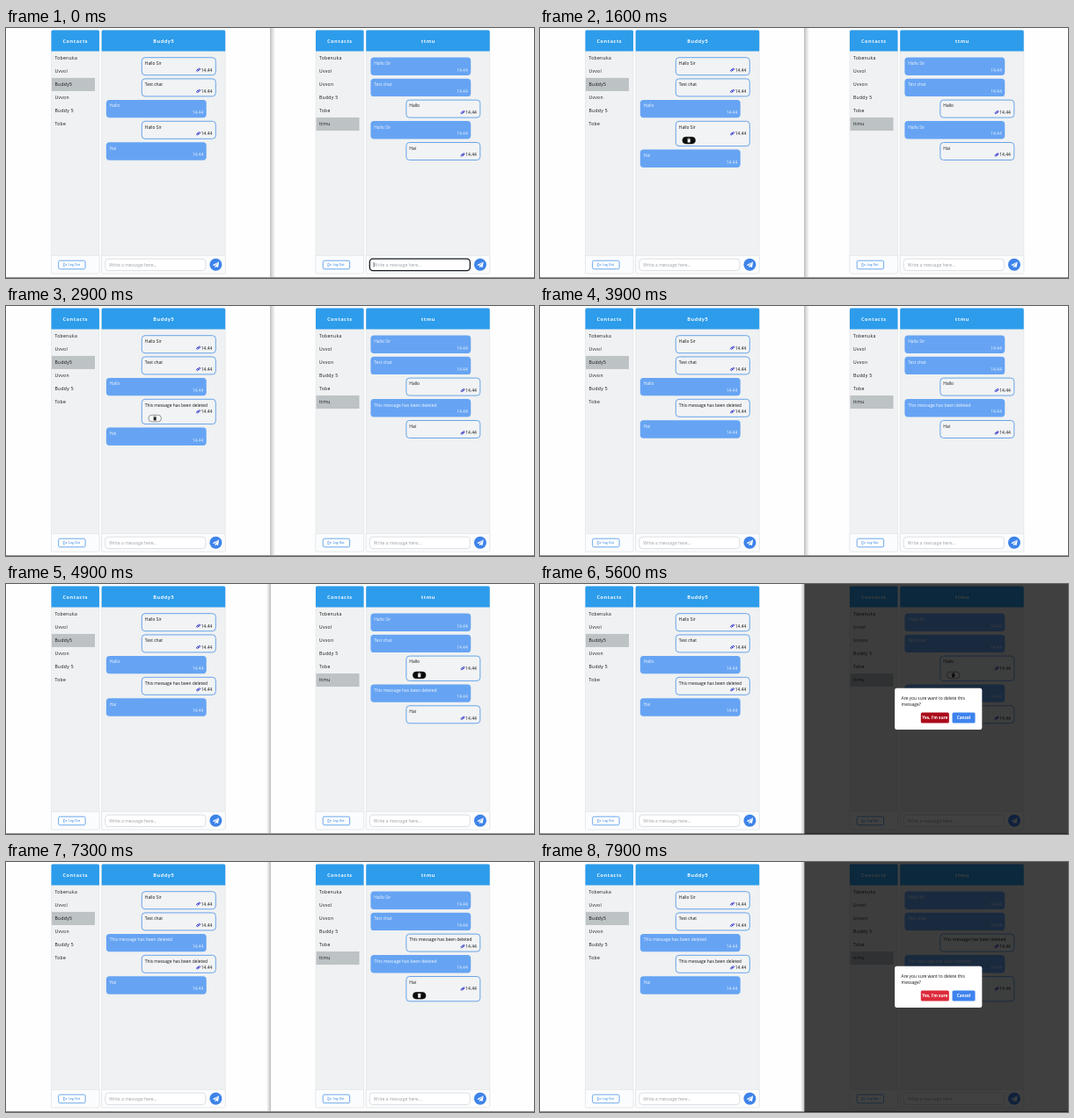
An HTML page with a canvas that plays this animation: 600x285 px, repeating every 8000 ms.

```html
<!DOCTYPE html>
<html lang="en">
<head>
<meta charset="utf-8">
<title>Two chat windows</title>
<style>
  html, body { margin: 0; width: 100%; height: 100%; overflow: hidden; background: #fff; }
  canvas { display: block; width: 600px; height: 285px; }
</style>
</head>
<body>
<canvas id="stage"></canvas>
<script>
const W = 600, H = 285, LOOP = 8000;
const GONE = 'This message has been deleted';
const FONT = '"Open Sans", "Noto Sans", sans-serif';
const canvas = document.getElementById('stage');
const ctx = canvas.getContext('2d');
const ratio = window.devicePixelRatio || 1;
canvas.width = W * ratio;
canvas.height = H * ratio;

const within = (t, a, b) => t >= a && t < b;

function text(str, x, y, color, { size = 4.9, weight = 400, align = 'left', gap = 0 } = {}) {
  ctx.font = `${weight} ${size}px ${FONT}`;
  ctx.letterSpacing = gap + 'px';
  ctx.textAlign = align;
  ctx.textBaseline = 'alphabetic';
  ctx.fillStyle = color;
  ctx.fillText(str, x, y + size * 0.36);
}

function box(x, y, w, h, r, fill, stroke, line = 1) {
  ctx.beginPath();
  ctx.roundRect(x, y, w, h, r);
  if (fill) { ctx.fillStyle = fill; ctx.fill(); }
  if (stroke) { ctx.strokeStyle = stroke; ctx.lineWidth = line; ctx.stroke(); }
}

function path(points, color, line) {
  ctx.beginPath();
  points.forEach(([x, y], i) => i ? ctx.lineTo(x, y) : ctx.moveTo(x, y));
  if (line) { ctx.strokeStyle = color; ctx.lineWidth = line; ctx.stroke(); }
  else { ctx.fillStyle = color; ctx.fill(); }
}

function seenMark(x, y) {
  ctx.save();
  ctx.translate(x, y);
  ctx.rotate(-0.65);
  box(-2.3, -0.9, 2.6, 1.6, 0.8, null, '#2626c8', 0.8);
  box(-0.3, -0.7, 2.6, 1.6, 0.8, null, '#2626c8', 0.8);
  ctx.restore();
}

function trash(x, y, hot) {
  const ink = hot ? '#fff' : '#222';
  box(x - 7.3, y - 3.8, 14.6, 7.6, 3.8, hot ? '#0b0b0b' : '#f7f8f9', hot ? '#0b0b0b' : '#555', 0.6);
  box(x - 1.5, y - 1.2, 3, 3.6, 0.5, ink);
  box(x - 2, y - 2.2, 4, 0.7, 0.2, ink);
  box(x - 0.7, y - 2.6, 1.4, 0.6, 0.2, ink);
}

function bubble(x, y, own, str, open, hot) {
  const h = open ? 28.3 : 20;
  if (own) {
    box(x + 0.5, y, 84, h, 3.7, '#f1f3f4', '#68a4e9', 1);
    text(str, x + 4, y + 6.5, '#111');
    text('14.44', x + 80.5, y + 14.1, '#111', { align: 'right' });
    seenMark(x + 64.8, y + 14);
    if (open) trash(x + 15.4, y + 21.8, hot);
  } else {
    box(x, y - 0.2, 113.8, 20.4, 3.7, '#66a4f3');
    text(str, x + 3.8, y + 6.5, '#f4f8ff');
    text('14.44', x + 110.3, y + 14.1, '#e8f1ff', { align: 'right' });
  }
  return h + 4.2;
}

function modal(x, hot) {
  ctx.fillStyle = 'rgba(0,0,0,0.745)';
  ctx.fillRect(x ? 300.5 : 0, 0, 300.5, H);
  ctx.save();
  ctx.translate(x, 0);
  box(102.3, 118.7, 99.2, 47.4, 2.4, '#fff');
  text('Are you sure want to delete this', 109.8, 130, '#111');
  text('message?', 109.8, 137.6, '#111');
  box(132, 146.4, 32, 12.2, 1.6, hot ? '#ab0a1b' : '#dc2b3b');
  text("Yes, I'm sure", 148, 152.5, '#fff', { weight: 700, size: 4.7, align: 'center' });
  box(167.7, 146.4, 26, 12.2, 1.6, '#3f83ee');
  text('Cancel', 180.7, 152.5, '#fff', { weight: 700, size: 4.7, align: 'center' });
  ctx.restore();
}

function chat(x, { title, names, active, messages, focus, caret }) {
  ctx.save();
  ctx.translate(x, 0);

  box(51.5, 2.7, 54.5, 277.3, 1.5, '#eff1f2', '#dfe3e6', 0.6);
  box(108.7, 2.7, 140.5, 277.3, 1.5, '#eff1f2', '#dfe3e6', 0.6);
  for (const [px, pw] of [[51.5, 54.5], [108.7, 140.5]]) {
    box(px, 2.5, pw, 24, [1.5, 1.5, 0, 0], '#2c9ceb');
    box(px, 259.5, pw, 20.5, [0, 0, 1.5, 1.5], '#fbfcfd', '#dfe3e6', 0.6);
  }
  const head = { size: 5.6, weight: 700, align: 'center', gap: 0.5 };
  text('Contacts', 78.8, 14.8, '#f2f8fe', head);
  text(title, 179.3, 14.6, '#f2f8fe', head);

  ctx.fillStyle = '#bdc2c5';
  ctx.fillRect(52, 56.9 + (active - 2) * 15.05, 49, 15);
  names.forEach((n, i) => text(n, 55.4, 34.2 + i * 15.05, '#111', { size: 5, gap: 0.35 }));

  box(59.7, 265.2, 30.4, 9.6, 1.6, '#fff', '#5c9fe9', 0.9);
  path([[67, 268.3], [65.3, 268.3], [65.3, 271.7], [67, 271.7]], '#4b93e6', 0.6);
  path([[66.4, 270], [69, 270]], '#4b93e6', 0.6);
  path([[68, 268.9], [69.1, 270], [68, 271.1]], '#4b93e6', 0.5);
  text('Log Out', 71.2, 270, '#4b93e6', { size: 3.4, weight: 600 });

  box(112.8, 263.2, 114, 13.4, 3.6, '#fff', focus ? '#141a22' : '#d3d7dc', focus ? 1.3 : 0.8);
  text('Write a message here...', 117.3, 269.8, '#9a9fa6', { size: 5 });
  if (caret) path([[117.5, 267], [117.5, 272.5]], '#222', 0.6);

  ctx.beginPath();
  ctx.arc(238.4, 269.8, 7, 0, Math.PI * 2);
  ctx.fillStyle = '#3d83e9';
  ctx.fill();
  path([[242.2, 266.2], [234.6, 270.2], [236.8, 271.1]], '#fff');
  path([[242.2, 266.2], [237.4, 271.4], [237.5, 273.5], [238.6, 272], [241, 273]], '#fff');

  let y = 33.7;
  for (const m of messages) y += bubble(m.own ? 153.8 : 113.9, y, m.own, m.str, m.open, m.hot);
  ctx.restore();
}

function divider(rightOnTop) {
  const g = ctx.createLinearGradient(rightOnTop ? 300 : 301, 0, rightOnTop ? 296 : 306, 0);
  g.addColorStop(0, 'rgba(0,0,0,0.2)');
  g.addColorStop(1, 'rgba(0,0,0,0)');
  ctx.fillStyle = g;
  ctx.fillRect(rightOnTop ? 296 : 301, 0, rightOnTop ? 4 : 5, H);
  ctx.fillStyle = '#c3c3c3';
  ctx.fillRect(300, 0, 1, H);
}

function draw(t) {
  ctx.setTransform(ratio, 0, 0, ratio, 0, 0);
  ctx.fillStyle = '#fefefe';
  ctx.fillRect(0, 0, W, H);

  const first = t >= 2900 ? GONE : 'Hallo Sir';
  const second = t >= 5900 ? GONE : 'Hallo';
  const lines = ['Hallo Sir', 'Test chat', second, first, 'Hai'];
  const fromLeft = i => i !== 2 && i !== 4;

  const left = lines.map((str, i) => ({ str, own: fromLeft(i) }));
  left[3].open = within(t, 1100, 3000);
  left[3].hot = within(t, 1500, 1700);

  const right = lines.map((str, i) => ({ str, own: !fromLeft(i) }));
  right[2].open = within(t, 4100, 6000) || within(t, 6700, 6900);
  right[2].hot = within(t, 4500, 5000);
  right[4].open = t >= 7000;
  right[4].hot = within(t, 7200, 7600);

  const typing = t < 1500;
  chat(0, {
    title: 'Buddy5', active: 2, messages: left,
    names: ['Tobenuka', 'Uvvol', 'Buddy5', 'Uvvon', 'Buddy 5', 'Tobe']
  });
  chat(300.5, {
    title: 'ttmu', active: 5, messages: right,
    names: ['Tobenuka', 'Uvvol', 'Uvvon', 'Buddy 5', 'Tobe', 'ttmu'],
    focus: typing, caret: typing && Math.floor(t / 550) % 2 === 0
  });

  divider(t >= 4900);
  ctx.fillStyle = '#8c8c8c';
  ctx.fillRect(0, 284, W, 1);

  if (within(t, 1700, 2900)) modal(0, t >= 2600);
  if (within(t, 5000, 5900)) modal(300.8, t >= 5600);
  if (t >= 7600) modal(300.8, false);
}

const start = performance.now();
function tick() {
  draw((performance.now() - start) % LOOP);
  requestAnimationFrame(tick);
}
tick();
</script>
</body>
</html>
```
